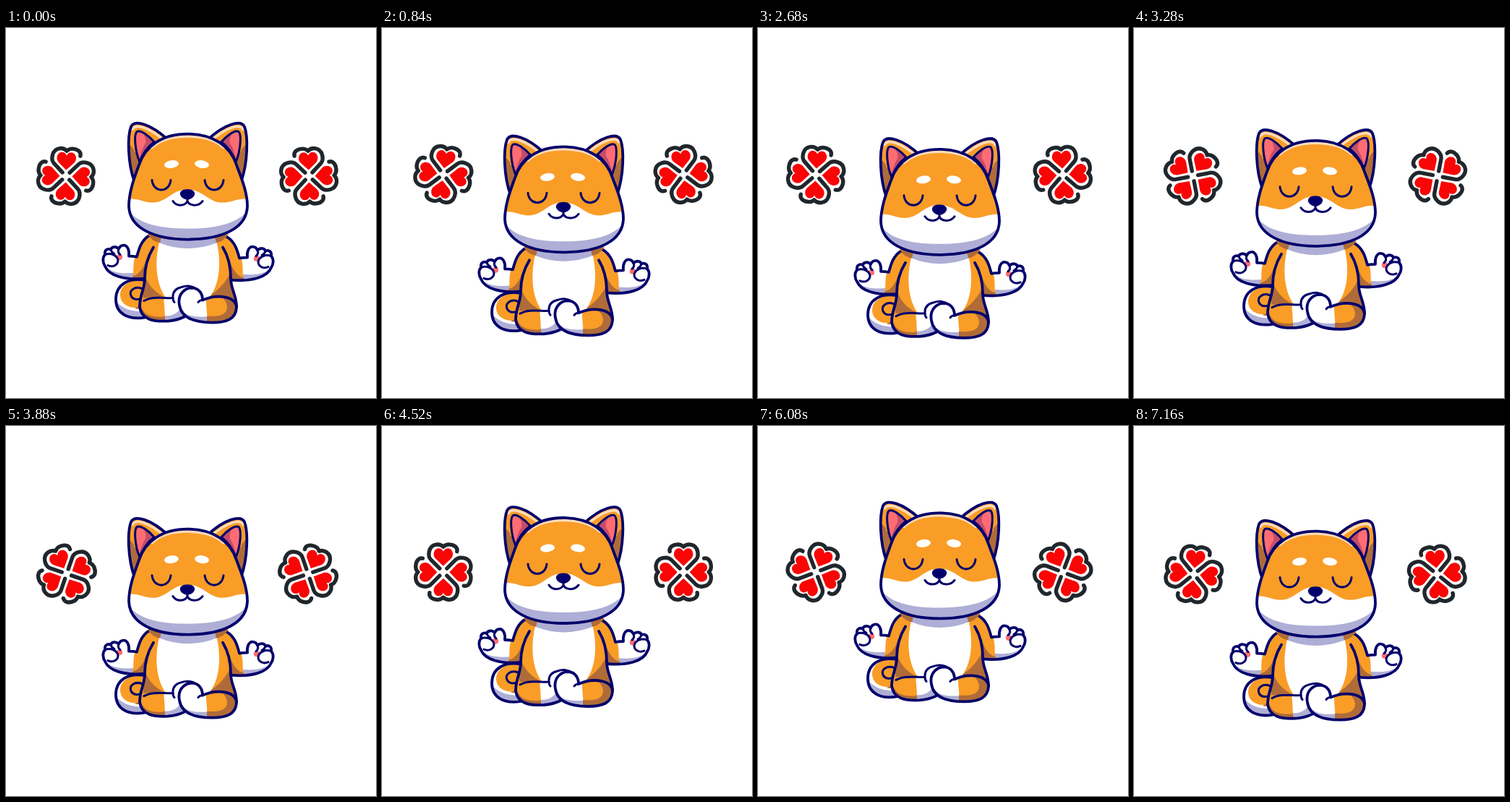
Animation, 512 px wide and 512 px high, one loop 7.2 s. Source, as an HTML page:

```html
<!DOCTYPE html>
<html lang="en">
<head>
<meta charset="utf-8">
<title>Meditating dog</title>
<style>
html, body { margin: 0; width: 100%; height: 100%; overflow: hidden; background: #fff; }
svg { display: block; width: 100%; height: 100%; }
.ink { fill: none; stroke: #03006b; stroke-width: 3.8; stroke-linecap: round; stroke-linejoin: round; }
.thin { stroke-width: 3; }
.orange { fill: #f99d27; }
.brown { fill: #b06c38; }
.white { fill: #fff; }
.lilac { fill: #aeaed6; }
.pink { fill: #ff6d72; }
.rose { fill: #c44d69; }
.cream { fill: none; stroke: #fedcbb; stroke-width: 3.4; stroke-linecap: round; }
</style>
</head>
<body>
<svg viewBox="0 0 512 512">
<defs>
  <g id="leaf">
    <path fill="none" stroke="#20272c" stroke-width="5.4" stroke-linecap="round" stroke-linejoin="round" d="M-5-5L-17-17C-22-22-21-36-10-38Q-4-39 0-35Q4-39 10-38C17-37 20-33 19-28.500"/>
    <path fill="#f90505" d="M0-8.500L-11-19C-16-25-12-33-6.500-33Q-2-33 0-28.500Q2-33 6.500-33C12-33 16-25 11-19Z"/>
  </g>
  <g id="clover">
    <use href="#leaf"/>
    <use href="#leaf" transform="rotate(90)"/>
    <use href="#leaf" transform="rotate(180)"/>
    <use href="#leaf" transform="rotate(270)"/>
  </g>

  <path id="tail" d="M194 350C170 345 152 355 152 376C152 395 168 405 192 401Z"/>
  <path id="torso" d="M199 286L204 304C196 317 192 332 192 347C192 362 185 370 185 386C187 404 204 407 224 406Q237 405 247 400Q264 408 285 408C308 408 319 402 319 386C319 370 311 362 311 347C311 332 308 317 300 304L305 286Z"/>
  <path id="arm" d="M199 287C187 294 184 306 181 317Q176 316 170 316C171 308 168 301 163 301Q158 301 156 306C152 302 146 303 145 307C140 305 136 308 137 314C133 318 134 326 137 330C142 343 164 350 193 347L214 300V287Z"/>
  <path id="ear" d="M178 214C168 187 168 150 173 137C178 127 200 133 224 155L195 200Z"/>
  <path id="innerEar" d="M185 186C178 169 177 148 181 144C186 141 197 149 205 158Q191 169 185 186Z"/>
  <path id="head" d="M251 147C215 147 192 165 184 190C179 204 170 226 170 247C171 278 206 293 251 293C299 293 333 278 334 247C334 226 324 204 319 190C311 165 288 147 251 147Z"/>
  <path id="foot" d="M240 384C237 369 247 360 258 360C268 361 272 369 272 377C283 372 294 371 304 373C314 375 319 381 319 387C318 403 306 408 285 408C262 408 243 403 240 384Z"/>

  <clipPath id="inTail"><use href="#tail"/></clipPath>
  <clipPath id="inTorso"><use href="#torso"/></clipPath>
  <clipPath id="inArm"><use href="#arm"/></clipPath>
  <clipPath id="inEar"><use href="#ear"/></clipPath>
  <clipPath id="inInner"><use href="#innerEar"/></clipPath>
  <clipPath id="inHead"><use href="#head"/></clipPath>
  <clipPath id="inFoot"><use href="#foot"/></clipPath>

  <g id="armSide">
    <g clip-path="url(#inArm)">
      <use href="#arm" class="white"/>
      <path class="lilac" d="M130 324C143 340 160 341 180 339V352H130Z"/>
      <path class="orange" d="M181 312C173 327 179 336 174 352H216V282H190Z"/>
      <path class="brown" d="M175 344Q187 341 193 324V352H174Z"/>
    </g>
    <ellipse class="pink" cx="157" cy="317.5" rx="4.2" ry="4"/>
    <path class="ink" d="M199 287C187 294 184 306 181 317Q176 316 170 316C171 308 168 301 163 301Q158 301 156 306C152 302 146 303 145 307C140 305 136 308 137 314C133 318 134 326 137 330C142 343 164 350 193 347"/>
    <path class="ink thin" d="M137 314C145 311 154 315 155 322C155 329 147 332 141 329M145 307Q146 311 150 313M156 306Q154 311 158 314"/>
  </g>
  <g id="earSide">
    <g clip-path="url(#inEar)">
      <use href="#ear" class="orange"/>
      <path class="brown" d="M166 160Q176 163 178 172L192 182V216H166Z"/>
      <path class="cream" d="M175 141C179 132 198 138 219 156"/>
    </g>
    <g clip-path="url(#inInner)">
      <use href="#innerEar" class="pink"/>
      <path class="rose" d="M186 140Q195 152 193 160Q187 168 183 190L210 170V146Z"/>
    </g>
    <use href="#innerEar" class="ink thin"/>
    <use href="#ear" class="ink"/>
  </g>
</defs>

<g id="left"><use href="#clover"/></g>
<g id="right"><use href="#clover" transform="scale(-1 1)"/></g>

<g id="dog">
  <g clip-path="url(#inTail)">
    <use href="#tail" class="white"/>
    <path class="lilac" d="M152 378Q164 394 194 393V408H152Z"/>
    <path class="orange" d="M198 346C172 348 157 356 158 371C159 384 172 391 198 387Z"/>
    <path class="brown" d="M194 376V390L178 389Q187 385 188 376Z"/>
  </g>
  <use href="#tail" class="ink"/>
  <path class="ink thin" d="M188 361C178 357 170 364 173 371C175 376 181 377 186 375"/>

  <use href="#armSide"/>
  <use href="#armSide" transform="matrix(-1 0 0 1 504 2)"/>

  <g clip-path="url(#inTorso)">
    <use href="#torso" class="orange"/>
    <path class="brown" d="M190 336Q197 364 222 374H190ZM314 332Q301 362 276 374L321 390V332Z"/>
    <path class="white" d="M216 284C205 314 205 353 222 375H280C299 353 298 314 288 284Z"/>
    <path class="brown" d="M185 387Q203 402 224 398V410H184Z"/>
    <path class="white" d="M217 373C221 386 218 395 222 409H250V372Z"/>
    <path class="lilac" d="M220 399Q235 399 241 389L250 401V410H222Z"/>
  </g>
  <path class="brown" d="M196 286Q203 297 214 298L217 286ZM308 286Q300 297 290 298L287 286Z"/>
  <path class="lilac" d="M216 286L213 298Q251 313 291 298L288 286Z"/>
  <path class="orange" d="M188 386C187 374 202 373 219 374Q217 386 219 400C202 401 190 398 188 386Z"/>
  <path class="ink" d="M204 304C196 317 192 332 192 347C192 362 185 370 185 386C187 404 204 407 224 406Q237 405 247 400M300 304C308 317 311 332 311 347C311 362 319 370 319 386"/>
  <path class="ink thin" d="M191 378C203 371 220 375 231 374Q230 362 243 359Q255 355 264 362"/>
  <path class="ink thin" d="M231 374Q231 378 233 380"/>

  <g clip-path="url(#inFoot)">
    <use href="#foot" class="white"/>
    <path class="lilac" d="M240 386C249 403 268 400 282 400V412H240Z"/>
    <path class="orange" d="M278 368C275 385 280 394 278 412H324V366Z"/>
    <path class="brown" d="M278 399C297 401 306 396 306 386Q305 377 296 371H322V412H278Z"/>
  </g>
  <use href="#foot" class="ink"/>
  <path class="ink thin" d="M272 377Q268 377 266 380"/>

  <use href="#earSide"/>
  <use href="#earSide" transform="matrix(-1 0 0 1 503 0)"/>
  <g clip-path="url(#inHead)">
    <use href="#head" class="orange"/>
    <path class="cream" d="M202 166C214 155 230 150.500 251 150.500S289 155 301 166"/>
    <path class="white" d="M166 238C182 234 189 243 206 242C224 240 230 224 251 224C272 224 279 240 297 242C314 243 321 234 338 238V298H166Z"/>
    <path class="lilac" d="M166 248C180 272 213 278 251 278S323 272 338 248V298H166Z"/>
  </g>
  <use href="#head" class="ink"/>
  <ellipse class="white" cx="229" cy="189" rx="10" ry="5.4" transform="rotate(-8 229 189)"/>
  <ellipse class="white" cx="271" cy="189" rx="10" ry="5.4" transform="rotate(8 271 189)"/>
  <path class="ink thin" d="M202 211C204 229 226 229 228 211M275 211C277 229 299 229 301 211"/>
  <path class="ink thin" d="M231 240C236 248 248 247 251 240C254 247 266 248 272 240M251 234V240"/>
  <path fill="#03006b" d="M251 223.500C258 223.500 262 227 261 231C260 235 255 238 251 238S242 235 241 231C240 227 244 223.500 251 223.500Z"/>
</g>
</svg>
<script>
const LOOP = 7200, STEP = 40, LAG = 20;
const heights = [0, 38, 2, -42, 0]; // dog offset at each quarter of the loop
const get = id => document.getElementById(id);
const dog = get("dog"), left = get("left"), right = get("right");

function bob(p) {
  const q = Math.floor(p * 4);
  return heights[q] + (heights[q + 1] - heights[q]) * (p * 4 - q);
}

function draw(now) {
  const p = (Math.floor(now / STEP) * STEP + LOOP - LAG) % LOOP / LOOP;
  const turn = 720 * p;
  dog.setAttribute("transform", `translate(0 ${bob(p)})`);
  // the clovers spin slightly off their own centres
  left.setAttribute("transform", `translate(82.5 202.7) rotate(${-turn}) translate(.5 2.3)`);
  right.setAttribute("transform", `translate(419.500 202.7) rotate(${turn}) translate(-.5 2.3)`);
  requestAnimationFrame(draw);
}
draw(performance.now());
</script>
</body>
</html>
```
